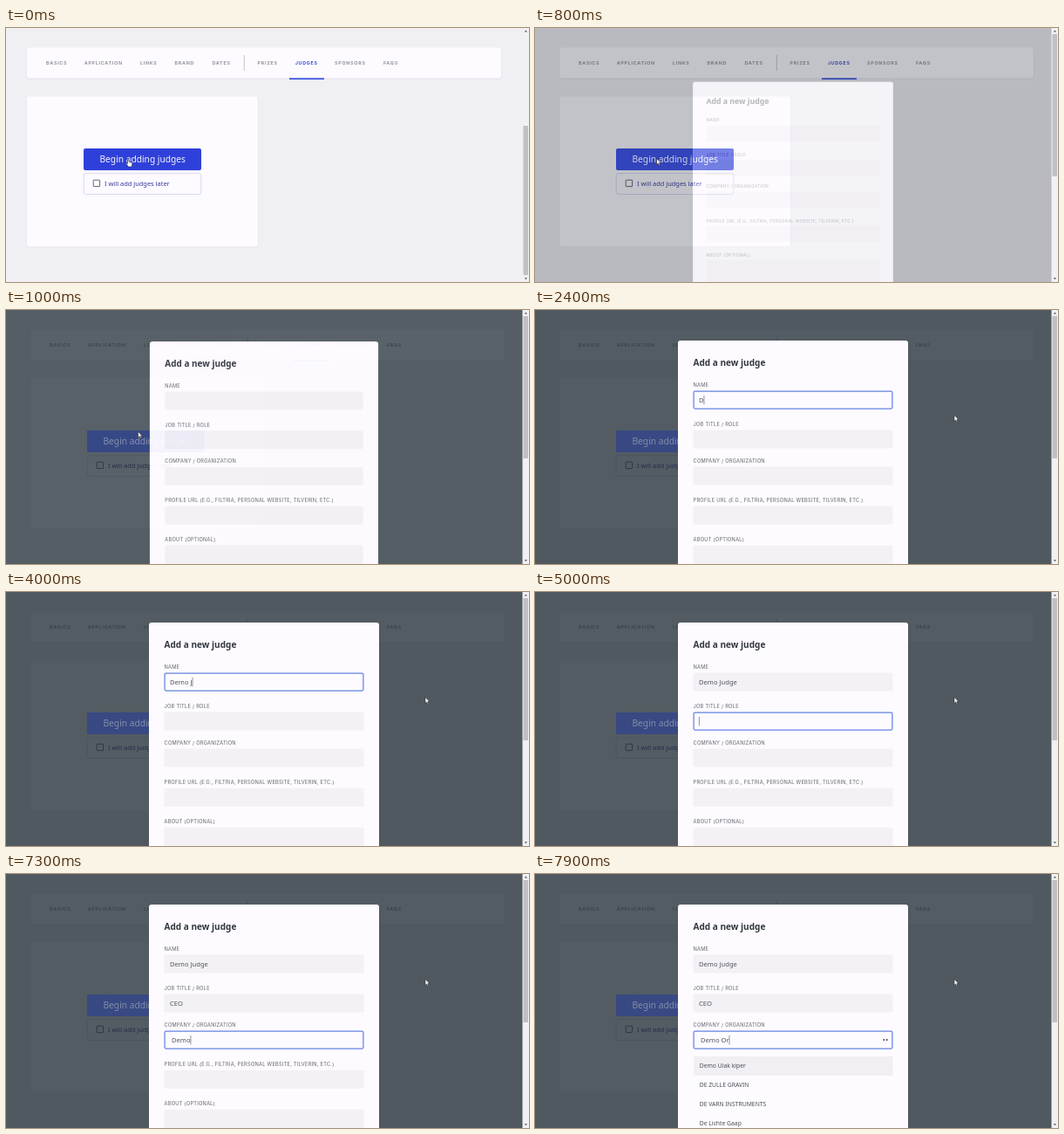
Animation of 600x291 px, one loop 8 s. Source, as an HTML page:

```html
<!DOCTYPE html>
<html lang="en">
<head>
<meta charset="utf-8">
<title>Add a judge</title>
<style>
  html, body { margin: 0; width: 100%; height: 100%; overflow: hidden; background: #f0eff4; }
  svg { display: block; width: 600px; height: 291px; }
  text { font-family: "Noto Sans", "Open Sans", sans-serif; white-space: pre; }
  .nav { font: 700 5.4px Inter, sans-serif; letter-spacing: .7px; fill: #96959f; }
  .nav.on { fill: #3a4fd8; }
  .label { font: 400 5.7px Inter, sans-serif; letter-spacing: .25px; fill: #62636b; }
  .value { font-size: 7.6px; fill: #50555c; }
  .row { font-size: 6.8px; fill: #4c4f57; }
  .begin { font-size: 10.2px; font-weight: 500; }
  .title { font-size: 10.05px; font-weight: 700; fill: #32373f; }
</style>
</head>
<body>
<svg viewBox="0 0 600 291">
  <clipPath id="window"><rect id="frame" x="164" y="35" width="264" height="330" rx="3"/></clipPath>
  <rect width="600" height="291" fill="#f0eff4"/>
  <g id="page">
    <g fill="#e4e2ea">
      <rect x="23.5" y="23" width="545" height="35.5" rx="3"/>
      <rect x="23.5" y="79" width="266" height="172.3" rx="3"/>
    </g>
    <g fill="#fdfbff">
      <rect x="24" y="22.5" width="544" height="35" rx="3"/>
      <rect x="24" y="78.5" width="265" height="172" rx="3"/>
    </g>
    <g id="nav"></g>
    <path d="M273.3 31V49" stroke="#b9b8c0" stroke-width=".8"/>
    <rect x="325" y="57.3" width="40" height="1.8" fill="#3d55e0"/>
    <rect x="89" y="138" width="135" height="25" rx="2" fill="#2f40da"/>
    <text class="begin" x="107.5" y="154" fill="#f6f5ff">Begin adding judges</text>
    <rect x="89.2" y="166.7" width="134.6" height="23.8" rx="2" fill="#fdfbff" stroke="#cfd0f3" stroke-width=".8"/>
    <rect x="100.2" y="174.2" width="7.4" height="7.4" rx=".5" fill="none" stroke="#55565f" stroke-width=".9"/>
    <text x="113" y="181" font-size="7.45" fill="#37389a">I will add judges later</text>
  </g>

  <g id="veil">
    <rect width="593" height="291" fill="rgb(27,39,47)" fill-opacity=".75"/>
    <rect x="93" y="138" width="135" height="25" rx="2" fill="#384983"/>
    <text class="begin" x="111.5" y="154" fill="#828da8">Begin adding judges</text>
  </g>

  <!-- the bright page shows through the window while it fades in -->
  <g id="through" clip-path="url(#window)">
    <rect width="600" height="291" fill="#f0eff4"/>
    <use href="#page"/>
  </g>

  <g id="modal">
    <rect x="164" y="35" width="264" height="330" rx="3" fill="#fdfbff"/>
    <text class="title" x="181.5" y="64">Add a new judge</text>
    <g id="form"></g>
    <g id="menu">
      <rect x="181.5" y="202" width="229" height="140" fill="#fdfbff"/>
      <rect x="182" y="209" width="228.5" height="22" fill="#f1eff3"/>
    </g>
    <g id="dots" fill="#3c3f48">
      <circle cx="400.3" cy="190" r="1"/><circle cx="403.7" cy="190" r="1"/>
    </g>
    <path id="caret" stroke="#484b52" stroke-width=".6"/>
  </g>

  <rect x="592.5" width="7.5" height="291" fill="#f1f0f3"/>
  <rect id="thumb" x="593.5" width="5.5" fill="#c0bfc3"/>
  <path d="M594.8 4.6L596.4 2.6 598 4.6ZM594.8 286.2L596.4 288.2 598 286.2Z" fill="#55555a"/>

  <g id="cursor" stroke="#222630" stroke-width=".6" stroke-linejoin="round">
    <path id="hand" fill="#fff" d="M0 .8Q.8-.4 1.5.8V3.4L4.9 4.2Q5.6 4.5 5.4 5.4L4.7 9H1.1L-1.7 5.6Q-1.7 4.5-.6 5L0 5.6Z"/>
    <path id="arrow" fill="#fff" d="M0 0V7L1.6 5.5 2.8 8 3.9 7.5 2.8 5.1H5Z"/>
    <path id="beam" fill="none" d="M-1.2-4H1.2M0-4V4M-1.2 4H1.2"/>
  </g>
</svg>

<script>
const LOOP = 8000, STEP = 100;
const NS = "http://www.w3.org/2000/svg";
const $ = id => document.getElementById(id);

function add(parent, tag, attrs, content = "") {
  const el = document.createElementNS(NS, tag);
  for (const k in attrs) el.setAttribute(k, attrs[k]);
  el.textContent = content;
  parent.append(el);
  return el;
}

const tabs = [["BASICS", 46], ["APPLICATION", 89.7], ["LINKS", 154], ["BRAND", 193.5], ["DATES", 236.5],
  ["PRIZES", 288.5], ["JUDGES", 331.7], ["SPONSORS", 377], ["FAQS", 433]];
for (const [name, x] of tabs)
  add($("nav"), "text", { class: name === "JUDGES" ? "nav on" : "nav", x, y: 42 }, name);

// ly: label baseline, top: box top, x: text start; focus, border and blur are times
const fields = [
  { label: "NAME", ly: 87.6, top: 92.5, x: 188, focus: 1500, border: 1500, blur: 5000,
    typed: [[2400, "D"], [3000, "De"], [3100, "Dem"], [3200, "Demo "], [4000, "Demo J"],
      [4100, "Demo Ju"], [4200, "Demo Jud"], [4300, "Demo Judg"], [4500, "Demo Judge"]] },
  { label: "JOB TITLE / ROLE", ly: 133, top: 137.6, x: 188, focus: 5000, border: 4900, blur: 5900,
    typed: [[5500, "C"], [5600, "CE"], [5800, "CEO"]] },
  { label: "COMPANY / ORGANIZATION", ly: 174.6, top: 179.5, x: 190, focus: 5900, border: 6400, blur: LOOP,
    typed: [[7000, "D"], [7100, "De"], [7200, "Dem"], [7300, "Demo"], [7400, "Demo "],
      [7700, "Demo O"], [7900, "Demo Or"]] },
  { label: "PROFILE URL (E.G., FILTRIA, PERSONAL WEBSITE, TILVERIN, ETC.)", ly: 220, top: 224.7 },
  { label: "ABOUT (OPTIONAL)", ly: 265.3, top: 269.8, h: 50 }
];
for (const f of fields) {
  add($("form"), "text", { class: "label", x: 181.5, y: f.ly }, f.label);
  add($("form"), "rect", { x: 181.5, y: f.top, width: 229, height: f.h || 21, rx: 1.5, fill: "#f3f1f5" });
  if (!f.typed) continue;
  f.ring = add($("form"), "rect", { x: 182.1, y: f.top + .6, width: 227.8, height: 19.9, rx: 1.5,
    fill: "#fdfbff", stroke: "#6684e4", "stroke-width": 1.25 });
  f.text = add($("form"), "text", { class: "value", x: f.x, y: f.top + 13.2 });
}

const results = [
  [7500, ["Demo Kelvarin", "Demo Brastuin", "Demo Ondrelle", "Demo Vostrup"]],
  [7900, ["Demo Ulak kiper", "DE ZULLE GRAVIN", "DE VARN INSTRUMENTS", "De Lichte Gaap"]]
];
const rows = [0, 1, 2, 3].map(i => add($("menu"), "text", { class: "row", x: 188.7, y: 222.4 + 22 * i }));

const path = [[0, 139.5, 150], [900, 139.5, 149.5], [1000, 151.5, 139.3], [1200, 198, 114],
  [1400, 240, 103], [1800, 240, 103], [2100, 385, 112], [2400, 481, 120.5], [LOOP, 481, 120.5]];

const clamp = v => Math.max(0, Math.min(1, v));
const easeOut = u => 1 - (1 - u) ** 3;
const latest = (steps, t, none) => steps.reduce((v, [at, next]) => t >= at ? next : v, none);
const show = (id, on) => $(id).style.display = on ? "" : "none";

function along(t) {
  const i = path.findIndex(p => p[0] > t);
  const [t0, x0, y0] = path[i - 1], [t1, x1, y1] = path[i];
  const u = (t - t0) / (t1 - t0);
  return [x0 + (x1 - x0) * u, y0 + (y1 - y0) * u];
}

function drawFields(t) {
  let caret = "";
  for (const f of fields) {
    if (!f.typed) continue;
    const entry = latest(f.typed, t, "");
    if (f.text.textContent !== entry) f.text.textContent = entry;
    f.ring.setAttribute("opacity", t < f.blur ? clamp((t - f.border + 100) / 200) : 0);
    if (t >= f.focus && t < f.blur) {
      const x = f.x + (entry ? f.text.getComputedTextLength() : 0) + .4;
      caret = `M${x} ${f.top + 5.4}v10.4`;
    }
  }
  $("caret").setAttribute("d", caret);
}

function draw(t) {
  const open = easeOut(clamp((t - 750) / 375));
  const zoom = `translate(296 240) scale(${.8 + .2 * open}) translate(-296 -240)`;
  const locked = t >= 600;
  $("page").setAttribute("transform", `translate(${locked ? 4 : 0})`);
  $("veil").setAttribute("opacity", open);
  $("modal").setAttribute("opacity", open);
  $("modal").setAttribute("transform", zoom);
  $("frame").setAttribute("transform", zoom);
  show("through", open > 0 && open < 1);
  $("thumb").setAttribute("y", locked ? 7 : 112);
  $("thumb").setAttribute("height", locked ? 163 : 171);

  drawFields(t);
  const names = latest(results, t, null);
  show("menu", names);
  rows.forEach((row, i) => row.textContent = names ? names[i] : "");
  show("dots", t >= 7700);

  const [x, y] = along(t);
  const inField = t > 1100 && x > 181 && x < 410 && y > 92 && y < 113;
  $("cursor").setAttribute("transform", `translate(${x} ${y})`);
  show("hand", !locked);
  show("arrow", locked && !inField);
  show("beam", inField);
}

const start = performance.now();
function tick() {
  const t = (performance.now() - start) % LOOP;
  draw(Math.floor(t / STEP) * STEP);
  requestAnimationFrame(tick);
}
tick();
</script>
</body>
</html>
```
